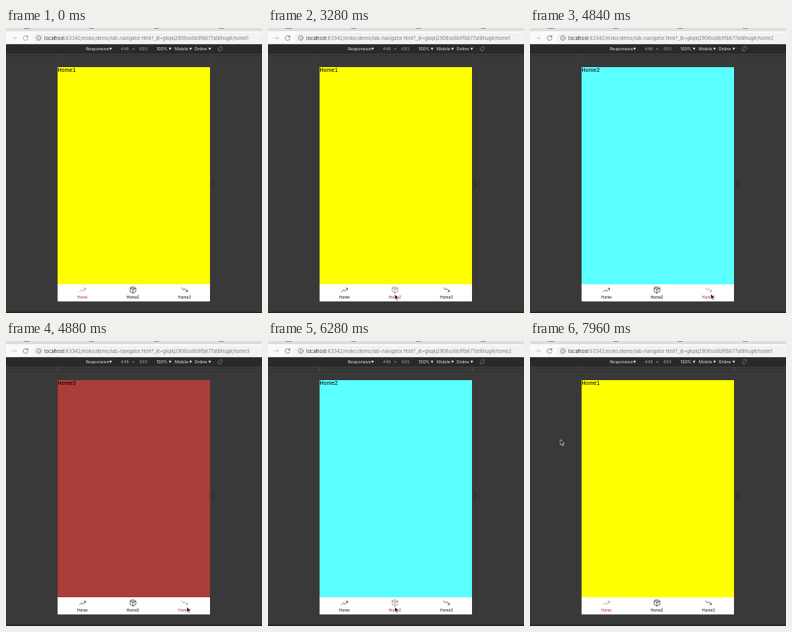
An HTML page for the animation above (8000 ms loop, 320x357 px).

```html
<!DOCTYPE html>
<html lang="en">
<head>
<meta charset="utf-8">
<title>Tab navigator demo</title>
<style>
  html, body { margin: 0; width: 100%; height: 100%; overflow: hidden; background: #393939; }
  svg { display: block; width: 320px; height: 357px; font-family: "Liberation Sans", Arial, sans-serif; }
  .url { font: 5.9px Inter, Roboto, sans-serif; fill: #7b7e82; }
  .url .host { fill: #303236; }
  .tools { font: 5.3px Inter, Roboto, sans-serif; fill: #e6e6e6; }
  .tools .dim { fill: #a0a0a0; }
  .line { fill: none; stroke-width: .7; stroke-linejoin: round; stroke-linecap: round; }
  .tab { fill: #111; font-size: 4.9px; text-anchor: middle; }
  .tab .line { stroke: #333; }
  .tab.active { fill: #b52b3d; }
  .tab.active .line { stroke: #a8837f; }
</style>
</head>
<body>
<svg viewBox="0 0 320 357">
  <!-- Browser chrome -->
  <rect width="320" height="357" fill="#393939"/>
  <rect width="320" height="20.5" fill="#fafafa"/>
  <rect width="320" height="4" fill="#dcdee2"/>
  <path d="M22 0h8M104 0h6M185 0h6M266 0h6" stroke="#777" stroke-width="1.6"/>
  <rect x="33" y="6" width="300" height="13" rx="6.5" fill="#f1f2f4"/>
  <path class="line" d="M7 12.5h6M10.5 10l2.5 2.5l-2.5 2.5" stroke="#c0c2c5"/>
  <path id="reload" class="line" d="M27 10.8a3 3 0 1 0 .5 2.4M27.3 9.2v2h-2"/>
  <g class="line" stroke="#6d7074">
    <circle cx="41" cy="12.5" r="2.9"/>
    <path d="M41 12.3v1.7M41 10.9v.1"/>
  </g>
  <text class="url" x="48" y="14.7"><tspan class="host">localhost</tspan>:63342/moko/demo/tab-navigator.html?_ijt=gkqkj2908so6b9fb677atlilhug#/<tspan id="route"></tspan></text>

  <!-- Device toolbar -->
  <rect y="20.5" width="320" height="11.5" fill="#292929"/>
  <g class="tools">
    <text x="100" y="28">Responsive</text>
    <text class="dim" x="143.5" y="28">448</text>
    <text class="dim" x="157.5" y="28">×</text>
    <text class="dim" x="167" y="28">693</text>
    <text x="188" y="28">100%</text>
    <text x="211" y="28">Mobile</text>
    <text x="235.5" y="28">Online</text>
    <path d="M129 24.7h3.4l-1.7 3zM203.4 24.7h3.4l-1.7 3zM229 24.7h3.4l-1.7 3zM253 24.7h3.4l-1.7 3z"/>
  </g>
  <path class="line" d="M265.5 25.5l2-2l3 3l-2 2zM265 27q.5 2 2.3 2M271 25q-.5-2-2.3-2" stroke="#999" style="stroke-width:.5"/>
  <path d="M0 34.5H320M0 38.5H320" stroke="#333"/>
  <path d="M64.5 33v5M255.5 33v5" stroke="#484848"/>
  <path d="M258.5 189v11M260.3 189v11" stroke="#2d2d2d" stroke-width=".7"/>
  <rect y="355.5" width="320" height="1.5" fill="#202020"/>

  <!-- Page -->
  <rect id="page" x="64.5" y="49" width="190.5" height="272.5"/>
  <text id="title" x="64.5" y="55" font-size="7"></text>
  <rect x="64.5" y="321" width="190.5" height="21.5" fill="#fff"/>
  <g class="tab">
    <path class="line" d="M92 330.5l2.3-2.5l2 1.7l3-3.5M97.5 326h2v2"/>
    <text x="95.5" y="339">Home</text>
  </g>
  <g class="tab">
    <path class="line" d="M158.7 324l3.5 1.8v4.4l-3.5 1.8l-3.5-1.8v-4.4zM155.2 325.8l3.5 1.8l3.5-1.8M158.7 327.6v4.4M157 325l3.5 1.8"/>
    <text x="158.7" y="339">Home2</text>
  </g>
  <g class="tab">
    <path class="line" d="M219.5 325.5l2.3 2.7l2-1.5l3 3.3M224.8 330.2h2v-2"/>
    <text x="223" y="339">Home3</text>
  </g>

  <path id="cursor" d="M0 0V6.8L1.6 5.3L2.7 7.9L3.8 7.4L2.7 4.9H4.9Z" fill="#111" stroke="#fff" stroke-width=".6"/>
</svg>
<script>
  const LOOP = 8000;
  const $ = id => document.getElementById(id);
  const tabs = document.querySelectorAll('.tab');
  const colors = ['#ffff00', '#5affff', '#ab3e38'];

  // [time, tab index]: the tab highlights first, then the page follows.
  const taps = [[0, 0], [3280, 1], [4840, 2], [6200, 1], [7440, 0]];
  const pages = [[0, 0], [3320, 1], [4880, 2], [6280, 1], [7520, 0]];

  // [start, end, from x, from y, to x, to y, sag]
  const moves = [
    [1200, 1680, 157, 353, 158.5, 333.5, 0],
    [4000, 4440, 158.5, 333.5, 226, 333, 0],
    [5400, 5920, 226, 333, 158.5, 333, 3],
    [6640, 7160, 158.5, 333, 96.5, 331.5, 0],
    [7800, 7960, 96.5, 331.5, 38, 123.5, 0]
  ];

  const latest = (list, t) => list.filter(item => item[0] <= t).pop();

  function moveCursor(t) {
    const move = latest(moves, t);
    $('cursor').style.display = t >= 1240 ? '' : 'none';
    if (!move) return;
    const [start, end, x0, y0, x1, y1, sag] = move;
    const p = Math.min(1, (t - start) / (end - start));
    const e = p * p * (3 - 2 * p);
    const x = x0 + (x1 - x0) * e;
    const y = y0 + (y1 - y0) * e + sag * Math.sin(Math.PI * e);
    $('cursor').setAttribute('transform', `translate(${x} ${y})`);
  }

  function render(now) {
    const t = Math.floor(now % LOOP / 40) * 40;
    const active = latest(taps, t)[1];
    const page = latest(pages, t)[1];
    tabs.forEach((tab, i) => tab.classList.toggle('active', i === active));
    $('page').setAttribute('fill', colors[page]);
    $('title').textContent = 'Home' + (page + 1);
    $('route').textContent = 'home' + (page + 1);
    $('reload').setAttribute('stroke', t < 2320 ? '#8d9094' : '#5f6368');
    moveCursor(t);
  }

  const start = performance.now();
  function tick() {
    render(performance.now() - start);
    requestAnimationFrame(tick);
  }
  tick();
</script>
</body>
</html>
```
